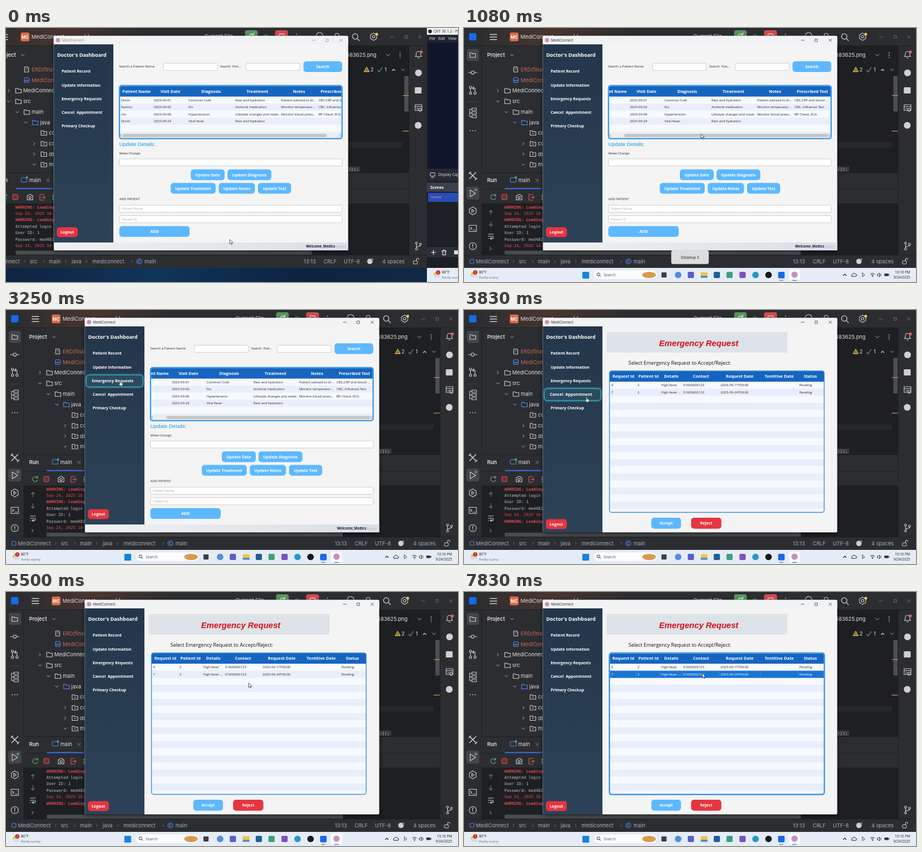
Animation of 800 by 450 pixels, one loop 8 s. Source, as an HTML page:

```html
<!DOCTYPE html>
<html lang="en">
<head>
<meta charset="utf-8">
<title>Clinic dashboard</title>
<style>
html, body { margin: 0; width: 100%; height: 100%; overflow: hidden; background: #1e1f22; }
svg { display: block; width: 100%; height: 100%; }
text { white-space: pre; }
.ui { font-family: "Open Sans", sans-serif; }
.ide { font-family: Inter, sans-serif; }
.mono { font-family: "DejaVu Sans Mono", monospace; }
.arial { font-family: "Liberation Sans", sans-serif; }
</style>
</head>
<body>
<svg id="stage" viewBox="0 0 800 450" xmlns="http://www.w3.org/2000/svg"></svg>
<script>
const LOOP = 8000, FPS = 12;
const BLUE = '#5db8ff', RED = '#e63540', HEAD = '#1565c0', GREY = '#ced0d6';

// --- drawing helpers; text is placed by its vertical middle ---
const rect = (x, y, w, h, fill, r = 0, more = '') =>
  `<rect x="${x}" y="${y}" width="${w}" height="${h}" rx="${r}" fill="${fill}" ${more}/>`;
const dot = (x, y, r, fill, more = '') => `<circle cx="${x}" cy="${y}" r="${r}" fill="${fill}" ${more}/>`;
const line = (d, color = GREY, w = 1.1, fill = 'none') =>
  `<path d="${d}" fill="${fill}" stroke="${color}" stroke-width="${w}" stroke-linecap="round" stroke-linejoin="round"/>`;
const text = (x, y, s, size, fill, cls = 'ui', more = '') =>
  `<text x="${x}" y="${y + size * .36}" font-size="${size}" fill="${fill}" class="${cls}" ${more}>${s}</text>`;
const B = 'font-weight="700"', MID = 'text-anchor="middle"', END = 'text-anchor="end"';
const ide = (x, y, s, fill = '#dfe1e5', more = '') => text(x, y, s, 9.2, fill, 'ide', more);
const group = (id, body, more = '') => `<g id="${id}" ${more}>${body}</g>`;
const down = (x, y, s = 2.5, c = '#b4b8bf') => line(`M${x - s} ${y - s / 2}l${s} ${s} ${s} ${-s}`, c, 1);
const right = (x, y, s = 2.5, c = '#b4b8bf') => line(`M${x - s / 2} ${y - s}l${s} ${s} ${-s} ${s}`, c, 1);
const dots = (x, y, dx, dy, c = GREY) => [-1, 0, 1].map(i => dot(x + i * dx, y + i * dy, .9, c)).join('');
const folder = (x, y, c = GREY) => line(`M${x - 5} ${y - 4}h3.5l1.5 1.5h5v6.5h-10z`, c);
const lens = (x, y, r, c, w = 1.3) => dot(x, y, r, 'none', `stroke="${c}" stroke-width="${w}"`) +
  line(`M${x + r * .75} ${y + r * .75}l${r * .8} ${r * .8}`, c, w);
const ring = (x, y, r, c = GREY) => dot(x, y, r, 'none', `stroke="${c}" stroke-width="1.1"`);
const button = (x, y, w, h, s, fill = BLUE) =>
  rect(x, y, w, h, fill, 5) + text(x + w / 2, y + h / 2, s, 7, '#fff', 'ui', `${B} ${MID}`);
const field = (x, y, w, h, hint = '') => rect(x, y, w, h, '#fff', 1.5, 'stroke="#c4c4c4" stroke-width=".8"') +
  text(x + 4.5, y + h / 2, hint, 5.9, '#aaa');
const label = (x, y, s, fill = '#2b2b2b') => text(x, y, s, 5.95, fill);
const frame = (x, y, w, h) => rect(x, y, w, h, 'none', 4, 'stroke="#6db5ee" stroke-width="2.4"') +
  rect(x, y, w, h, 'none', 4, 'stroke="#1e88e5" stroke-width="1.2"');

// --- code editor behind the app ---
const tools = () =>
  rect(5, 37, 21.5, 21.5, '#43454a', 4) + folder(15.5, 48) +
  ring(15.5, 79, 2.8) + line('M8 79h4.5M18.5 79h4.5') +
  ring(11.5, 105, 2) + ring(11.5, 115.5, 2) + ring(19.5, 115.5, 2) + line('M11.5 107v6.5M19.5 113.5v-7h-4M17.5 104l-2.5 2.5 2.5 2.5') +
  line('M7 131h17', '#43454a') +
  line('M10 144v13M10 150.5h4M10 157h4M10 144h4M14 146h8v-4h-8zM14 152.5h8v-4h-8zM14 159h8v-4h-8z') + dots(15.5, 182, 4.5, 0) +
  line('M10 256l11 11M10 267l11-11M9 258l3-3M20 269l3-3', GREY, 1.5) +
  rect(4, 281, 23, 23, '#43454a', 4) + line('M11 287l9.5 6-9.5 6z') + dot(21, 287, 2.4, '#57965c') +
  line('M15.5 317l6 3.5v7l-6 3.5-6-3.5v-7zM13.8 321.3l4.5 2.8-4.5 2.8z') +
  line('M9 349.5h13v11h-13zM11.5 353l2.5 2-2.5 2M16 358h3.5') +
  ring(15.5, 386.5, 6.3) + line('M15.5 383v4', GREY, 1.3) + dot(15.5, 389.7, .8, GREY);

const tree = () => {
  const rows = [[130, 'src', 60], [149, 'main', 75], [167.5, 'java', 90]];
  const packs = [[186, 'com', 0], [205, 'config', right], [223.5, 'dbms', right], [242, 'mediconnect', down]];
  return ide(41, 48, 'Project', '#dfe1e5', 'font-weight="600"') + down(85, 48) +
    line('M88 69h5l2 2v7h-7z') + text(91.5, 74, '?', 6, GREY, 'ide', MID) + ide(100.5, 73.5, 'ERD(final).png', '#d1675a') +
    rect(87.5, 88, 8.5, 8.5, 'none', 1, 'stroke="#548af7"') + line('M88 95l3-3 2 2 2-2', '#548af7') + ide(100.5, 92.5, 'MediConnect', '#d1675a') +
    right(60, 111) + folder(77, 111) + ide(85.5, 111, 'MediConnect') +
    rows.map(([y, s, x]) => down(x, y) + folder(x + 17, y, s === 'java' ? '#548af7' : GREY) + ide(x + 25.5, y, s)).join('') +
    packs.map(([y, s, mark]) => (mark ? mark(105, y) : '') + folder(122, y) + dot(122, y + .5, 1.1, GREY) + ide(131, y, s)).join('');
};

const LOG = ['WARNING: Loading', 'Sep 24, 2025 10:', 'WARNING: Loading', 'Attempted login', 'User ID: 1',
  'Password: med482', 'Sep 24, 2025 10:', 'WARNING: Loading'];
const LOG_STEP = 11.45;
const runPanel = () =>
  rect(31, 256, 737, 55, '#2b2d30') + rect(31, 311, 737, 91, '#1e1f22') + rect(31, 256, 737, 1, '#1e1f22') + rect(31, 285, 737, .8, '#1e1f22') +
  ide(41, 269.5, 'Run', '#dfe1e5', 'font-weight="600"') + rect(82, 265, 10, 8, 'none', 1, 'stroke="#548af7"') +
  dot(92, 265, 2.2, '#57965c') + ide(96, 269.5, 'main') + line('M127 267.5l5 5M132 267.5l-5 5', '#868a91', .9) + rect(72, 283.5, 66, 2, '#3574f0', 1) +
  line('M55.5 297a4.5 4.5 0 1 0 .5 4M56 294v3.5h-3.5', '#6aab73') + rect(67, 295, 9, 9, '#6b2e30', 1, 'stroke="#db5c5c"') +
  line('M92.5 297h2l1-2h4l1 2h2v7.5h-10z') + ring(97.5, 300.5, 2) + line('M122 295h-7v10h7M118 300h6M122 298l2 2-2 2', '#db5c5c') + dots(138, 300, 0, 3.5) +
  line('M47.5 331v-8M44.5 326l3-3 3 3M47.5 343v8M44.5 348l3 3 3-3', '#6f737a') +
  line('M43 365h9M43 369h7a2 2 0 0 1 0 4h-3M48.5 371.5l-2 1.5 2 1.5M43 373h1') + right(47, 391) +
  '<g clip-path="url(#console)">' + group('log', LOG.map((s, i) =>
    text(71.5, 317 + i * LOG_STEP, s, 7.1, /^[WS]/.test(s) ? '#e0484f' : '#bcbec4', 'mono', s[0] === 'W' ? B : '')).join('')) + '</g>' +
  rect(72, 394.5, 524, 7, '#4a4c4f');

const editor = () =>
  rect(0, 0, 800, 425, '#2b2d30') + rect(20, 0, 280, 31, 'url(#glow)') + rect(245, 31, 523, 225, '#1e1f22') +
  rect(0, 31, 800, .8, '#1e1f22') + rect(31, 31, .8, 371, '#1e1f22') + rect(768, 31, .8, 371, '#1e1f22') +
  rect(9, 9, 13, 13, '#1769e8', 2) + line('M46 11.5h12M46 16h12M46 20.5h12', GREY, 1.3) +
  rect(81, 8, 15.5, 15.5, '#dd6b4a', 3) + text(88.8, 16, 'MC', 7.5, '#fff', 'ide', `${B} ${MID}`) +
  ide(100, 16, 'MediConnect') + ide(406, 15, 'Current File') +
  line('M195 19v-8M195 15h6v-4', GREY) +
  rect(478, 4, 22.5, 23, '#57965c', 4) + line('M493 12a4.5 4.5 0 1 0 1 4M493.5 8.5v3.5h-3.5', '#fff') + ring(515, 16, 4, '#6aab73') +
  rect(531, 4, 23, 23, '#d54b50', 4) + rect(538, 10.5, 9, 9, 'none', 1, 'stroke="#fff"') +
  dots(569, 15, 0, 4) + line('M604 14a6 6 0 0 1 12 0') + ring(641, 13, 3.5) +
  lens(673, 15, 4.8, GREY) + line('M705.5 9l5.5 3.2v6.6l-5.5 3.2-5.5-3.2v-6.6z') + ring(705.5, 15.5, 2.2) + dot(711, 11, 2.5, '#f2c55c') +
  line('M735 16h6', '#777', .8) + rect(761, 13.5, 4.5, 4.5, 'none', 0, 'stroke="#777" stroke-width=".8"') + line('M785 13.5l4.5 4.5M789.5 13.5l-4.5 4.5', '#888', .8) +
  tools() + tree() +
  text(657.5, 48, '583625.png', 9.3, '#dfe1e5', 'ide') + down(731.5, 48, 3) + dots(752.5, 48, 0, 3.8) +
  line('M693.5 69.5l4.5 8h-9z', '#f2c55c', 1, '#8a713a') + ide(700, 74, '2') + line('M713 75l2.5 3 5-8', '#57965c', 1.4) + ide(725, 74, '1') +
  line('M738.5 75.5l2.5-2.5 2.5 2.5') + down(757.5, 74) +
  rect(760, 85, 7.5, 63, '#4d4e51') + rect(757, 119, 11, 1.2, '#c29a43') + rect(757, 182, 11, 1.2, '#c29a43') +
  rect(245, 202, 512, 10, '#26282e') + rect(625, 245.5, 57, 9, '#37393d') + text(661, 250, ')});', 7.5, '#bcbec4', 'mono') +
  line('M779.5 50.5h11l-1.5-2v-3a4 4 0 0 0-8 0v3zM783.5 53h3') + dot(790, 42.5, 2.7, '#db5c5c') +
  dot(785, 79.5, 6, GREY) + rect(778.5, 105, 12, 11, GREY, 1) +
  line('M779 136h12v10h-12zM779 139.5h12M781.5 143h4') + ring(788, 145, 2.5) + dot(784.5, 172.5, 6, GREY) +
  ring(781.5, 381, 1.8) + ring(781.5, 391.5, 1.8) + ring(788.5, 383, 1.8) + line('M781.5 383v6.5M788.5 385c0 3-7 1-7 4') +
  runPanel() +
  rect(0, 402, 800, 23, '#2b2d30') + rect(0, 402, 800, .8, '#1e1f22') +
  rect(10.5, 410, 7, 7, 'none', 1, 'stroke="#548af7"') +
  [[21, 'MediConnect'], [97, 'src', 88], [131, 'main', 122], [171, 'java', 161], [208, 'mediconnect', 198], [300, 'main', 278]].map(([x, s, arrow]) =>
    ide(x, 413.5, s, '#a8adbd') + (arrow ? right(arrow, 413.5, 2, '#6f737a') : '')).join('') +
  ring(291, 413.5, 4.5, '#548af7') + line('M293 412a2.3 2.3 0 1 0 0 3', '#548af7') +
  [[582, '13:13'], [617, 'CRLF'], [653, 'UTF-8'], [721, '4 spaces']].map(([x, s]) => ide(x, 413.5, s, '#a8adbd')).join('') +
  dot(699, 413.5, 4.8, GREY) + dot(703, 410, 2, '#57965c') + rect(776, 412.5, 7, 5.5, 'none', 1, `stroke="${GREY}"`) + line('M781.5 412v-2a2 2 0 0 1 4 0');

// --- app window ---
const MENU = ['Patient Record', 'Update Information', 'Emergency Requests', 'Cancel  Appointment', 'Primary Checkup'];
const menuY = i => 77 + i * 24.2;
const cells = (xs, y, row, fill = '#262626') => row.map((s, i) => label(xs[i], y, s, fill)).join('');
const heads = (xs, y, names) => names.map((s, i) => text(xs[i], y, s, 7.3, '#fff', 'ui', `${B} ${MID}`)).join('');
const stripes = (x, y, w, h, end) => Array.from({ length: Math.ceil((end - y) / h) }, (_, i) =>
  rect(x, y + i * h, w, Math.min(h, end - y - i * h), i % 2 ? '#e9effa' : '#f6f9ff')).join('');

const VISITS = [
  ['Omid', '2025-09-01', 'Common Cold', 'Rest and hydration', 'Patient advised to dr...', 'CBC,CRP and blood ...'],
  ['Karimo', '2025-09-02', 'Flu', 'Antiviral medication', 'Monitor temperatur...', 'CBC, Influenza Test'],
  ['rilo', '2025-09-06', 'Hypertension', 'Lifestyle changes and meds', 'Monitor blood press...', 'BP Check, ECG'],
  ['Omid', '2025-09-24', 'Viral fever', 'Rest and hydration']];
const updatePage = () =>
  label(255, 68, 'Search a Patient Name') + field(333.5, 62.5, 95.5, 12.5) + label(434, 68, 'Search  Pati...') + field(480, 62.5, 95.5, 12.5) +
  button(581.5, 59, 68.5, 19, 'Search') +
  '<g clip-path="url(#visits)">' + stripes(256, 121.5, 394, 12.45, 186) + rect(256, 102.5, 394, 19, HEAD) +
  group('visitCols', heads([286, 346, 418, 500, 573.5, 639.5], 112.5, ['Patient Name', 'Visit Date', 'Diagnosis', 'Treatment', 'Notes', 'Prescribed Test']) +
    VISITS.map((r, i) => cells([258.5, 316.5, 378, 461, 542, 608], 127.7 + i * 12.45, r)).join('')) +
  rect(256, 186, 394, 9.5, '#ededed') + group('thumb', rect(262, 188, 360, 4.8, '#c6c6c6', 2, 'stroke="#b0b0b0" stroke-width=".5"')) +
  line('M259.5 188.5l-2 2 2 2M645.5 188.5l2 2-2 2', '#666', .8) + '</g>' +
  frame(255.8, 102, 394, 94) +
  text(255.5, 206, 'Update Details:', 9.4, '#1c9ad6', 'arial') + label(255.5, 221.5, 'Make Change') + field(255.5, 232, 394.5, 12.5) +
  button(382, 250.5, 60, 19, 'Update Date') + button(447, 250.5, 77.5, 19, 'Update Diagnosis') +
  button(346.5, 274.5, 79.5, 19, 'Update Treatment') + button(431.5, 274.5, 64, 19, 'Update Notes') + button(501, 274.5, 58.5, 19, 'Update Test') +
  label(255.5, 303, 'ADD PATIENT') + field(255.5, 314, 394.5, 12.5, 'Patient Name') + field(255.5, 332.5, 394.5, 12.5, 'Patient ID') +
  button(255.5, 351, 124.5, 19, 'ADD') +
  rect(140, 380, 520.5, 14, 'url(#foot)') + text(637.5, 387, 'Welcome_Medics', 6.1, '#1c1c28', 'ui', `${B} ${END}`) + label(638.5, 387, 'Ready', '#b3bac0');

const REQS = [['4', '2', 'High fever', '01600000123', '2025-09-17T00:00', '', 'Pending'],
  ['7', '2', 'High fever ...', '01600000123', '2025-09-24T00:00', '', 'Pending']];
const REQ_X = [260.5, 307, 349, 388, 454, 526, 593.5];
const requestPage = () =>
  rect(252.5, 39, 320, 36.5, '#dde3e8') + text(415.5, 58.5, 'Emergency Request', 14.6, '#d30f1b', 'arial', `${B} font-style="italic" ${MID}`) +
  text(291, 94, 'Select Emergency Request to Accept/Reject:', 8.98, '#111') +
  '<g clip-path="url(#requests)">' + stripes(257, 127, 381, 12.5, 358.5) + rect(257, 108, 381, 19, HEAD) +
  heads([282, 326.5, 367, 419.5, 488, 558, 613], 117.7, ['Request Id', 'Patient Id', 'Details', 'Contact', 'Request Date', 'Tentitive Date', 'Status']) +
  cells(REQ_X, 133.2, REQS[0]) + cells(REQ_X, 145.7, REQS[1]) + '</g>' +
  rect(257.5, 108, 380, 250.5, 'none', 4, 'stroke="#3a8fd9" stroke-width="1.4"') +
  group('picked', rect(258, 139.5, 379.5, 12.7, '#1a75d2') +
    [304.5, 346.5, 385.5, 451.5, 524, 591].map(x => rect(x, 139.5, .6, 12.7, '#4a95e0')).join('') + cells(REQ_X, 145.7, REQS[1], '#fff') +
    frame(257.3, 108, 380.6, 250.8)) +
  button(331.5, 368, 52.5, 19.5, 'Accept') + button(402, 368, 53.5, 19.5, 'Reject', RED);

const app = () =>
  rect(139.5, 14, 521, 380, '#f4f4f5', 2, 'filter="url(#shade)"') + rect(139.5, 13.7, 521, 15.5, '#f1f2f4', 2) +
  dot(147, 21.5, 3.8, '#c98fb8') +
  group('caption', text(154, 21.7, 'MediConnect', 6.4, '#222') +
    line('M597 21.7h5M646 19.5l4.5 4.5M650.5 19.5l-4.5 4.5', '#333', .8) + rect(621, 19.5, 4.5, 4.5, 'none', .5, 'stroke="#333" stroke-width=".8"')) +
  rect(139.5, 29, 105.5, 365, 'url(#side)') + text(145.5, 47.5, "Doctor's Dashboard", 8.9, '#fff', 'ui', B) +
  MENU.map((s, i) =>
    group('hot' + i, rect(142.5, menuY(i) - 10, 99.5, 20.5, '#2fc9d2', 5, 'stroke="#2fd3da" stroke-width="2" filter="url(#cyan)"') +
      rect(142.5, menuY(i) - 10, 99.5, 20.5, '#2d4a60', 5, 'stroke="#38b4bf" stroke-width=".7"')) +
    group('item' + i, text(153.5, menuY(i), s, 6.9, '#fff', 'ui', B))).join('') +
  group('logout', button(145, 353, 37, 17.5, 'Logout', RED)) + group('update', updatePage()) + group('request', requestPage());

// --- neighbouring desktop and taskbar ---
const weather = x => dot(x + 17, 437, 5, '#f5b83d') + rect(x + 12, 437, 12, 5, '#d4dce8', 2.5) + dot(x + 20, 433, 3.8, '#c42b1c') +
  text(x + 20, 433, '3', 5, '#fff', 'ui', MID) + text(x + 26.5, 433, '86°F', 6.3, '#222') + text(x + 26.5, 441.5, 'Partly sunny', 6, '#666');
const neighbour = () =>
  rect(800, 0, 800, 450, '#1d1f26') + rect(800, 0, 800, 12, '#eef0f3') + dot(805.5, 6, 3.3, '#26272b') + text(812, 6, 'QVT 30.1.2 - Profile', 6.5, '#333') +
  rect(800, 12, 800, 13, '#22252d') + text(804, 18.5, 'File   Edit   View', 6.8, '#eee') + rect(802, 26, 796, 223, '#10162b') +
  rect(800, 250, 800, 21, '#272a33') + rect(806, 256.5, 8, 6, 'none', 1, 'stroke="#ddd"') + line('M808 265h4', '#ddd') + text(820, 260, 'Display Capture', 6.8, '#e6e6e6') +
  rect(800, 274, 800, 16, '#3c404d') + text(806, 282, 'Scenes', 7, '#fff', 'ui', B) + rect(802, 292, 100, 16, '#284cb8') + text(807, 300, 'Scene', 6.8, '#e58da0') +
  rect(800, 388, 800, 18, '#2c303a') + line('M808 397.5h7M811.5 394v7', '#fff', 1.2) + line('M826 395h8M828 395v7h5v-7M829 393.5h3', '#fff') + rect(848, 394, 7, 7, '#ddd', 1) +
  rect(800, 425, 800, 25, '#e5ecf5') + weather(800);
const taskbar = () =>
  rect(0, 425, 800, 25, '#e5ecf5') + weather(0) + rect(209.5, 432, 12, 12, '#1583dc', 1) +
  rect(229, 429, 113, 16.5, '#fbfcfe', 8, 'stroke="#d3d9e2" stroke-width=".6"') + lens(238, 436.5, 2.6, '#333', 1) + text(247, 437.5, 'Search', 6.8, '#555') +
  '<ellipse cx="327.5" cy="437.5" rx="12" ry="5.5" fill="#d99a4e"/>' +
  rect(349.5, 433, 9, 9, '#3a3d42', 1) + dot(379, 437.5, 5.8, '#4f8fd6') + rect(396, 432, 11, 11, '#5b5fc7', 2) +
  rect(419, 432.5, 12, 10, '#f6c244', 1.5) + rect(419, 439, 12, 3.5, '#3c92dc', 1) +
  rect(442, 432, 11, 11, '#1f5f99', 2) + rect(464.5, 432, 11, 11, '#3f9f80', 2) + rect(487.5, 432, 11, 11, '#7d4fbf', 2) +
  dot(516, 437.5, 5.8, '#2498c9') + dot(539, 437.5, 5.8, '#16181c') + rect(556, 432, 11.5, 11.5, '#1769e8', 2) +
  rect(575, 428, 20, 19, '#fafcff', 3) + dot(585, 437, 5.5, '#c98fb8') + rect(558, 446.5, 7, 1.3, '#777', .6) + rect(581, 446.5, 8, 1.3, '#2f7cd0', .6) +
  line('M671.5 438.5l2.5-2.5 2.5 2.5', '#222') + line('M687 440h6a2 2 0 0 0 0-4 3 3 0 0 0-5.5 .5 1.8 1.8 0 0 0-.5 3.5', '#222', 1) + line('M705 434v6.5l4-2.5z', '#222', .8) +
  line('M719.5 436a5 5 0 0 1 7 0M721.3 438a2.5 2.5 0 0 1 3.4 0', '#222', 1) + dot(723, 440, .9, '#222') +
  line('M732 436h1.5l2-2v7l-2-2h-1.5zM737.5 435.5a3 3 0 0 1 0 4', '#222', .9) + rect(744, 435, 7.5, 4.5, '#333', 1) + rect(752, 436.3, 1, 2, '#333') +
  text(789.5, 433, '10:16 PM', 6.2, '#222', 'ui', END) + text(789.5, 441.5, '9/24/2025', 6.2, '#222', 'ui', END);

const grad = (id, dir, ...stops) => `<linearGradient id="${id}" x2="${dir === 'x' ? 1 : 0}" y2="${dir === 'y' ? 1 : 0}">` +
  stops.map((c, i) => `<stop offset="${i / (stops.length - 1)}" stop-color="${c}"/>`).join('') + '</linearGradient>';
const clip = (id, x, y, w, h) => `<clipPath id="${id}">${rect(x, y, w, h, '#000', 3)}</clipPath>`;
const stage = document.getElementById('stage');
stage.innerHTML = '<defs>' + grad('glow', 'x', '#2b2d30', '#4a352e', '#2b2d30') + grad('side', 'y', '#24364b', '#2d4258') +
  grad('foot', 'x', '#eef1f4', '#e4e8ec', '#d8dfe6') + grad('wall', 'x', '#0f2440', '#10345a', '#0c2340', '#102c4a') +
  clip('console', 71, 311, 700, 82) + clip('visits', 256, 102.5, 393.5, 93) + clip('requests', 257.5, 108, 380, 250.5) +
  '<filter id="shade" x="-10%" y="-10%" width="120%" height="120%"><feDropShadow dx="0" dy="2" stdDeviation="4" flood-opacity=".5"/></filter>' +
  '<filter id="cyan" x="-10%" y="-50%" width="120%" height="200%"><feGaussianBlur stdDeviation="1.8"/></filter></defs>' +
  rect(0, 420, 800, 30, 'url(#wall)') + group('desks', editor() + app() + neighbour()) + group('taskbar', taskbar()) +
  group('tip', rect(367, 394, 66, 24, '#dcdddf', 3, 'stroke="#c5c6c8" stroke-width=".6"') + text(400, 406.5, 'Desktop 3', 6.8, '#1c1c1c', 'ui', MID)) +
  group('cursor',
    group('arrow', line('M0 0v7.5l1.8-1.6 1.2 2.7 1.2-.5-1.2-2.6h2.4z', '#222', .7, '#fff')) +
    group('beam', line('M-1.5-3.5h3M0-3.5v7M-1.5 3.5h3', '#222', .8)) +
    group('hand', line('M-.8 .5q.8-1.2 1.6 0v3.2l3 .8q.8 .4 .6 1.5l-.7 3h-4l-2.4-3.4q-.3-1.2 1.9 0z', '#222', .6, '#fff')));

// --- motion ---
const $ = id => document.getElementById(id);
const show = (id, on) => $(id).setAttribute('display', on ? 'inline' : 'none');
const move = (id, x, y = 0) => $(id).setAttribute('transform', `translate(${x} ${y})`);
const fade = (id, v) => $(id).setAttribute('opacity', v);
const clamp = v => Math.max(0, Math.min(1, v));
const ease = v => v * v * (3 - 2 * v);
const ramp = (t, a, b) => ease(clamp((t - a) / (b - a)));

const PATH = [[0, 396, 375], [170, 420.5, 323], [670, 398, 190], [830, 398, 189], [1080, 419.5, 188], [1500, 420, 188],
  [2420, 211, 101], [2700, 210, 103], [3200, 202, 125], [3420, 203, 126], [3830, 217, 154], [4900, 215, 153],
  [5500, 429.5, 161.5], [5800, 432, 160], [6500, 478.5, 146], [7170, 478.5, 146], [7830, 422, 144.8]];
const pointer = t => {
  const i = PATH.findIndex(p => p[0] > t);
  if (i < 0) return PATH[PATH.length - 1].slice(1);
  const [a, x, y] = PATH[i - 1], [b, u, v] = PATH[i], k = ramp(t, a, b);
  return [x + (u - x) * k, y + (v - y) * k];
};

function draw(time) {
  const step = Math.floor((time % LOOP + 4) * FPS / 1000), t = step * 1000 / FPS;
  const slid = step >= 2, second = t >= 3410;
  move('desks', slid ? 0 : -55 * (1 - clamp(t / 167)) ** 2);
  show('taskbar', slid);
  fade('caption', slid ? 1 : .5);
  show('tip', slid && t < 1900);
  fade('tip', 1 - ramp(t, 1600, 1900));

  const scroll = ramp(t, 830, 1080);
  move('visitCols', -23 * scroll);
  move('thumb', 22 * scroll);
  show('update', !second);
  show('request', second);
  move('log', 0, second ? -2 * LOG_STEP : 0);
  move('logout', 0, second ? 17.5 : 0);
  show('picked', t >= 6660);

  const [x, y] = pointer(t);
  let over = -1;
  MENU.forEach((_, i) => {
    const hot = x > 143 && x < 242 && Math.abs(y - menuY(i)) < 10;
    if (hot) over = i;
    show('hot' + i, hot);
    $('item' + i).setAttribute('transform', hot ? `translate(192 ${menuY(i)}) scale(1.04) translate(-192 ${-menuY(i)})` : '');
  });
  const typing = !second && [[232, 244.5], [314, 326.5], [332.5, 345]].some(([a, b]) => x > 255 && x < 650 && y > a && y < b);
  move('cursor', x, y);
  show('hand', over >= 0);
  show('beam', typing);
  show('arrow', over < 0 && !typing);
}

const start = performance.now();
const tick = now => { draw(Math.max(0, now - start)); requestAnimationFrame(tick); };
draw(0);
requestAnimationFrame(tick);
</script>
</body>
</html>
```
